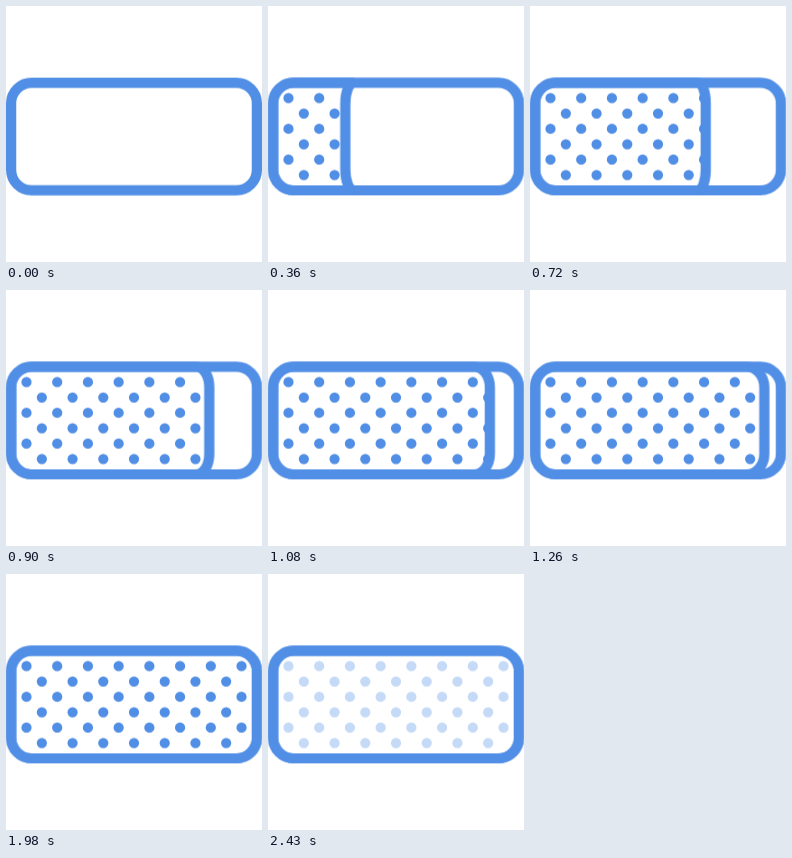
Recreate the animation shown at these times as an HTML page. Size 256x256 px, loop 2520 ms.

```html
<!DOCTYPE html>
<html lang="en">
<head>
<meta charset="utf-8">
<title>Filling panel</title>
<style>
  html, body { margin: 0; width: 100%; height: 100%; overflow: hidden; background: #fff; }
  svg { display: block; width: 100%; height: 100%; }

  .line { fill: none; stroke: #518ee5; stroke-width: 2; }
  .dots { stroke-linecap: round; stroke-dasharray: .001 5.999; animation: fade 2520ms linear infinite; }
  .cover { fill: #fff; animation: uncover 2520ms linear infinite; }
  .panel { animation: grow 2520ms linear infinite; }

  /* The divider morphs from the left side of the frame to its right side. */
  @keyframes grow {
    0% {
      visibility: hidden;
      animation-timing-function: step-end;
      d: path("M5 15C2.79 15 1 16.79 1 19L1 32C1 34.21 2.79 36 5 36L5 36C2.79 36 1 34.21 1 32L1 19C1 16.79 2.79 15 5 15Z");
    }
    7.142857% {
      visibility: visible;
      animation-timing-function: cubic-bezier(.2, .61, .34, 1);
      d: path("M5 15C2.79 15 1 16.79 1 19L1 32C1 34.21 2.79 36 5 36L5 36C2.79 36 1 34.21 1 32L1 19C1 16.79 2.79 15 5 15Z");
    }
    78.571429%, 100% {
      visibility: visible;
      d: path("M45 15C47.21 15 49 16.79 49 19L49 32C49 34.21 47.21 36 45 36L5 36C2.79 36 1 34.21 1 32L1 19C1 16.79 2.79 15 5 15Z");
    }
  }
  @keyframes uncover {
    0%, 7.142857% {
      animation-timing-function: cubic-bezier(.2, .61, .34, 1);
      d: path("M5 15C2.79 15 1 16.79 1 19L1 32C1 34.21 2.79 36 5 36L49 36L49 15Z");
    }
    78.571429%, 100% {
      d: path("M45 15C47.21 15 49 16.79 49 19L49 32C49 34.21 47.21 36 45 36L49 36L49 15Z");
    }
  }
  @keyframes fade {
    0%, 89.285714% { opacity: 1; }
    100% { opacity: 0; }
  }
</style>
</head>
<body>
<svg viewBox="0 0 50 50">
  <path class="line dots" d="M4 18H46.1M7 21H43.1M4 24H46.1M7 27H43.1M4 30H46.1M7 33H43.1"/>
  <path class="cover" d="M5 15C2.79 15 1 16.79 1 19L1 32C1 34.21 2.79 36 5 36L49 36L49 15Z"/>
  <rect class="line" x="1" y="15" width="48" height="21" rx="4"/>
  <path class="line panel" d="M5 15C2.79 15 1 16.79 1 19L1 32C1 34.21 2.79 36 5 36L5 36C2.79 36 1 34.21 1 32L1 19C1 16.79 2.79 15 5 15Z"/>
</svg>
</body>
</html>
```
